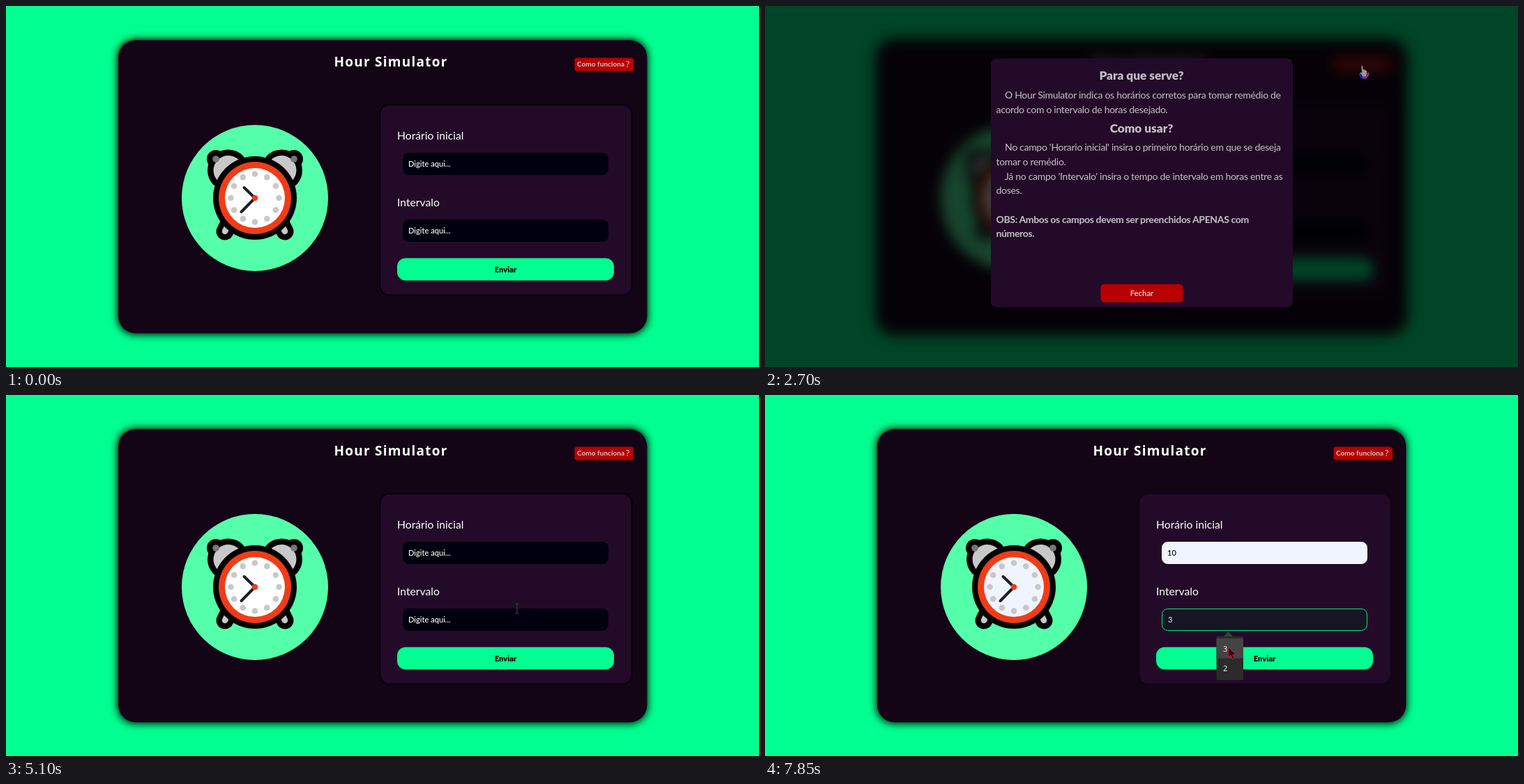
Write an HTML page that moves like this. It is 1080x519 px and loops after 8 s.

```html
<!DOCTYPE html>
<html lang="pt">
<head>
<meta charset="utf-8">
<title>Hour Simulator</title>
<style>
html, body { margin: 0; width: 100%; height: 100%; overflow: hidden; background: #00ff90; }
svg { display: block; width: 100vw; height: 100vh; --ink: #000; --field: #00000f; --face: #fff; --edge: #05000d; }
svg.soft { --ink: #130516; --field: #130516; --edge: #130516; }
svg.late { --face: #f0f4ff; --edge: #11041a; }
text { font-family: Lato, "Open Sans", sans-serif; fill: #fff; white-space: pre; }
.title { font: 700 19px "Noto Sans", sans-serif; letter-spacing: 1.25px; }
.label { font-size: 15.7px; }
.entry { font-size: 11.1px; font-weight: 500; }
.mid { text-anchor: middle; }
.head { font-size: 17.2px; font-weight: 900; fill: #c4c0c6; text-anchor: middle; }
.body { font-size: 14px; letter-spacing: -.3px; fill: #c4c0c6; }
.strong { font-weight: 700; letter-spacing: -.35px; }
.ink { fill: var(--ink); }
.item { font: 11px "Noto Sans", sans-serif; fill: #f2f2f2; }
.modal #page { filter: blur(9px); }
#dialog { display: none; }
.modal #dialog { display: block; }
</style>
</head>
<body>
<svg id="stage" viewBox="0 0 1080 519" preserveAspectRatio="none">
  <g id="page">
    <rect x="-100" y="-100" width="1280" height="719" fill="#00ff90"/>
    <rect x="160" y="48" width="760" height="424" rx="25" style="filter:blur(6px)"/>
    <rect x="161" y="49" width="758.500" height="421.500" rx="25" fill="#140516"/>
    <text class="title" x="470.500" y="87">Hour Simulator</text>
    <rect x="815.500" y="74.500" width="84.500" height="19" rx="3.500" fill="#b80000"/>
    <text x="819" y="87" font-size="10.100" font-weight="700" style="fill:#d0c8c8">Como funciona</text>
    <text x="889" y="88" font-size="12.500" style="fill:#d0c8c8;font-family:'Noto Sans',sans-serif">?</text>
    <g id="clock" transform="translate(357 276)"></g>
    <rect x="535.500" y="140.500" width="363.500" height="276.500" rx="14" style="fill:var(--edge)"/>
    <rect x="537.500" y="143" width="359" height="271.500" rx="12" fill="#240a29"/>
    <text class="label" x="561" y="192">Horário inicial</text>
    <text class="label" x="561" y="288">Intervalo</text>
    <g id="fields"></g>
    <rect x="561" y="362.500" width="311" height="32" rx="12" fill="#00ff90"/>
    <text class="mid" x="716.500" y="382.500" font-size="11.200" font-weight="900" style="fill:#000">Enviar</text>
    <g id="menus"></g>
  </g>
  <g id="dialog">
    <rect width="1080" height="519" opacity=".73"/>
    <rect x="324" y="75.500" width="433" height="357.500" rx="8" fill="#240a29"/>
    <text class="head" x="540" y="106">Para que serve?</text>
    <text class="head" x="540" y="181.500">Como usar?</text>
    <g id="lines"></g>
    <rect id="closeBox" x="481.500" y="400" width="118" height="26" rx="5"/>
    <text id="closeText" class="mid" x="540.500" y="417" font-size="11.300" font-weight="700">Fechar</text>
  </g>
  <g id="pointer">
    <path id="arrow" d="M.7 .7V15L4 12L6.500 17.800L9 16.600L6.500 11.200H11Z" fill="#16000c" stroke="#e0104c"/>
    <g id="hand">
      <path d="M1 12C2 21 12 21 13.500 12" fill="none" stroke="#2a20ff" stroke-width="2"/>
      <path d="M5 17C9 20 13 17 13.500 11" fill="none" stroke="#f0107c" stroke-width="2"/>
      <path d="M3 1.500Q4.200 -.300 5.300 1.500L6 6Q8 5.600 8.600 7Q11 6.700 11.500 9V13L10 17H5.500L1.500 11.500Q1.500 9.500 4 10.500Z" fill="#989898" stroke="#2b2630" stroke-width=".8"/>
    </g>
    <path id="beam" d="M-3 -7H-1L0 -6L1 -7H3M0 -6V6M-3 7H-1L0 6L1 7H3" fill="none" stroke="#0c5a1c" stroke-width="1.200"/>
  </g>
</svg>
<script>
const $ = id => document.getElementById(id);
const stage = $("stage");
const circle = (x, y, r, fill) => `<circle cx="${x}" cy="${y}" r="${r}" style="fill:${fill}"/>`;
const stroke = (d, w, color) =>
  `<path d="${d}" fill="none" stroke-width="${w}" stroke-linecap="round" style="stroke:${color}"/>`;

function drawClock() {
  const ink = "var(--ink)", grey = "#c8c8c8";
  const dome = "M-53.500 -25A21 21 0 0 1 -23 -54.500Z";
  const half = `
    ${circle(-56, -56, 13, ink)}
    <path d="${dome}" style="fill:${ink};stroke:${ink}" stroke-width="17" stroke-linejoin="round"/>
    <path d="${dome}" fill="${grey}"/>
    ${circle(-56, -56, 4.8, "#777")}
    ${stroke("M-34 30L-43 48", 25, ink)}
    ${stroke("M-34 30L-43 48", 8.500, grey)}`;
  const dots = Array.from({ length: 12 }, (_, i) => {
    const a = i * Math.PI / 6;
    return circle(34.5 * Math.sin(a), -34.5 * Math.cos(a), 4.3, grey);
  }).join("");
  $("clock").innerHTML = circle(0, 0, 105, "#55ffaa") +
    half + `<g transform="scale(-1 1)">${half}</g>` +
    circle(0, 0, 60, ink) + circle(0, 0, 52, "#f03c18") + circle(0, 0, 43, "var(--face)") + dots +
    stroke("M0 0L-15.500 -15", 4, "#201c24") + stroke("M0 0L-19.500 20", 4, "#201c24") +
    circle(0, 0, 4.3, "#f03c18");
}

// Two inputs, 96 px apart, each with its own suggestion menu
const inputs = [
  { dy: 0, items: ["10", "dq"], focus: [5750, 7300], menu: [5800, 6900], hover: 6500, fade: 6500 },
  { dy: 96, items: ["3", "2"], focus: [7300, 8000], menu: [7350, 8000], hover: 7750, fade: 7820 }
];

function drawInputs() {
  for (const f of inputs) {
    $("fields").insertAdjacentHTML("beforeend", `<g transform="translate(0 ${f.dy})">
      <rect x="569.500" y="211.500" width="294" height="31" rx="8"/>
      <text class="entry" x="577" y="231"></text></g>`);
    $("menus").insertAdjacentHTML("beforeend", `<g transform="translate(0 ${f.dy})">
      <path d="M658 251L664.500 244L671 251Z" fill="#3c3c3c"/>
      <rect x="647.500" y="251" width="38.500" height="63" rx="2" fill="#2b2b2b"/>
      <rect x="647.500" y="254" width="38.500" height="28.500" fill="#444"/>
      <text class="item" x="657" y="272.500">${f.items[0]}</text>
      <text class="item" x="657" y="301">${f.items[1]}</text></g>`);
    [f.box, f.text] = $("fields").lastElementChild.children;
    f.list = $("menus").lastElementChild;
    f.row = f.list.children[2];
  }
}

function drawLines() {
  const rows = [
    [344, 133, "O Hour Simulator indica os horários corretos para tomar remédio de"],
    [331.5, 153.5, "acordo com o intervalo de horas desejado."],
    [344, 208, "No campo 'Horario inicial' insira o primeiro horário em que se deseja"],
    [331.5, 229, "tomar o remédio."],
    [344, 249.5, "Já no campo 'Intervalo' insira o tempo de intervalo em horas entre as"],
    [331.5, 270, "doses."],
    [331.5, 311.5, "OBS: Ambos os campos devem ser preenchidos APENAS com", "strong"],
    [331.5, 332, "números.", "strong"]
  ];
  $("lines").innerHTML = rows.map(([x, y, s, c = ""]) =>
    `<text class="body ${c}" x="${x}" y="${y}">${s}</text>`).join("");
}

// time, x, y
const path = [
  [0, 9, -18], [300, 9, -18], [700, 300, -14], [850, 480, -6], [1150, 740, 45],
  [1450, 840, 79], [1650, 848, 87], [2500, 848, 87], [2550, 852, 85], [2900, 852, 85],
  [3500, 700, 290], [4000, 566, 417], [4200, 558, 414], [4750, 558, 414],
  [5100, 733, 307], [5250, 713, 228], [5350, 713, 228], [5400, 715, 228], [6100, 715, 228],
  [6500, 676, 265], [6650, 674, 263], [6900, 674, 264], [7250, 690, 322], [7400, 690, 322],
  [7750, 666, 364], [7850, 664, 362], [8000, 664, 362]
];
const shapes = [[0, "arrow"], [1350, "hand"], [2950, "arrow"], [5050, "beam"], [6250, "arrow"], [7150, "beam"], [7500, "arrow"]];

function pointAt(t) {
  const i = Math.max(1, path.findIndex(p => p[0] >= t));
  const [t0, x0, y0] = path[i - 1], [t1, x1, y1] = path[i];
  const k = (t - t0) / (t1 - t0);
  return [x0 + (x1 - x0) * k, y0 + (y1 - y0) * k];
}

const within = (t, [a, b]) => t >= a && t < b;
const show = (el, on) => { el.style.display = on ? "" : "none"; };
const mix = (a, b, k) => `rgb(${a.map((v, i) => Math.round(v + (b[i] - v) * k))})`;

function render(t) {
  stage.classList.toggle("soft", within(t, [850, 1750]) || within(t, [6100, 6900]));
  stage.classList.toggle("late", t >= 7000);
  stage.classList.toggle("modal", within(t, [2700, 4750]));

  const hot = within(t, [4000, 4750]);
  $("closeBox").style.fill = hot ? "#f40000" : "#b80000";
  $("closeText").style.fill = hot ? "#fff" : "#cfc4c8";

  for (const f of inputs) {
    const focused = within(t, f.focus), filled = t >= f.hover;
    const k = Math.min(1, Math.max(0, (t - f.fade) / 350));
    f.box.style.fill = k ? mix([0, 0, 15], [240, 244, 255], k) : "var(--field)";
    f.box.style.stroke = focused ? "#00e886" : f.box.style.fill;
    f.text.style.fill = mix([255, 255, 255], [0, 0, 0], k);
    f.text.textContent = filled ? f.items[0] : "Digite aqui...";
    f.text.setAttribute("x", focused ? 578 : 577);
    show(f.list, within(t, f.menu));
    show(f.row, filled);
  }

  const shape = shapes.filter(s => s[0] <= t).pop()[1];
  for (const id of ["arrow", "hand", "beam"]) show($(id), id === shape);
  $("pointer").setAttribute("transform", `translate(${pointAt(t)})`);
}

drawClock();
drawInputs();
drawLines();

const start = performance.now();
function tick() {
  const t = (performance.now() - start) % 8000;
  render(Math.floor(t / 50) * 50);
  requestAnimationFrame(tick);
}
tick();
</script>
</body>
</html>
```
